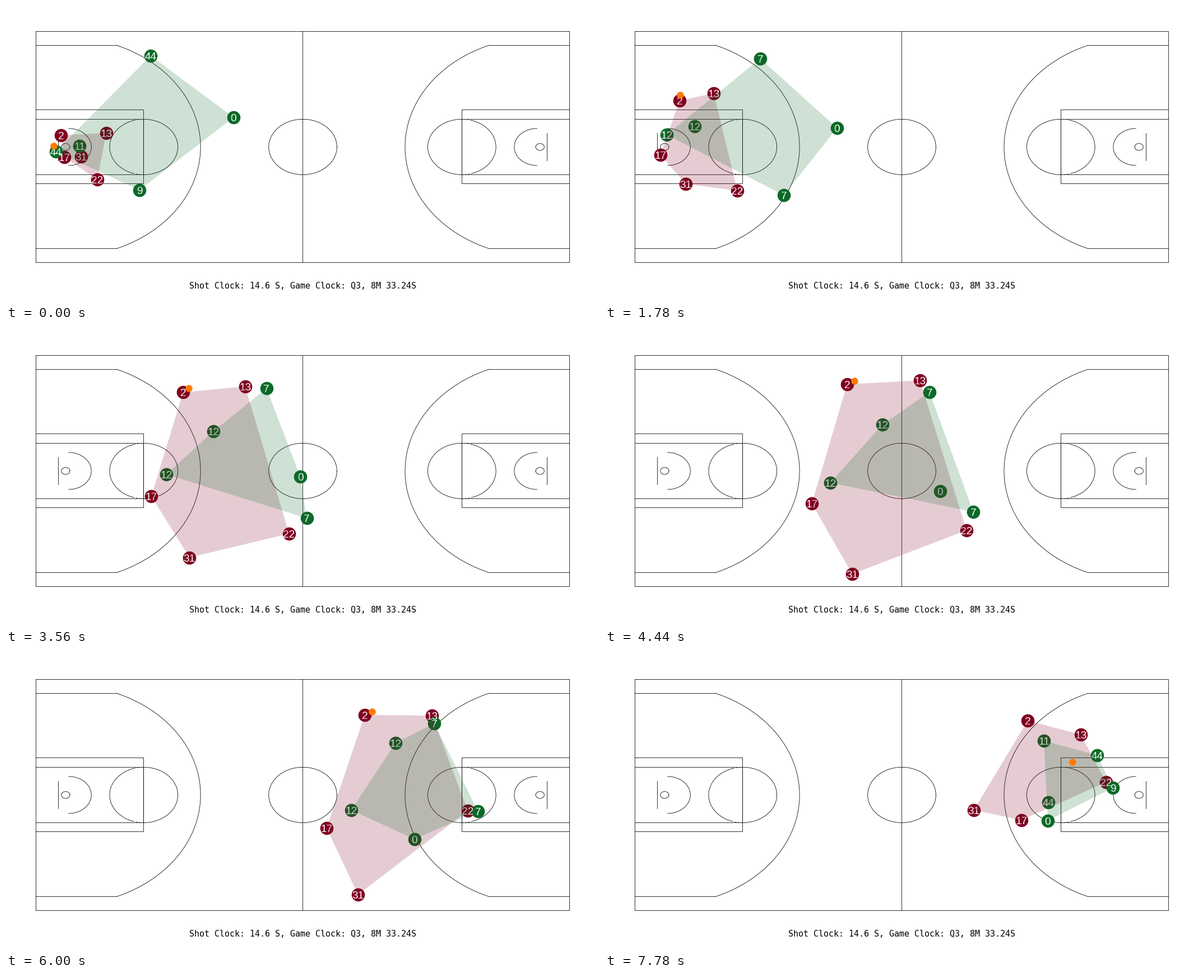
Recreate the animation shown at these times as a matplotlib script. Size 1058x529 px, loop 8 s.

```python
import numpy as np
import matplotlib.pyplot as plt
from matplotlib.animation import FuncAnimation
from matplotlib.patches import Polygon

W, H, DPI = 1058, 529, 100
LOOP_MS, TICK_MS, STEPS = 8000, 20, 36
PT = 72 / DPI  # points per pixel
MAROON, GREEN, ORANGE = "#800020", "#0c6a28", "#ff7a00"

# Each player: rebound, break, midcourt, arrival, set
KEYS = np.array([0, 8, 20, 27, 35])
MAROON_RUNS = {
    "2": [(98, 231), (133, 169), (432, 97), (640, 109), (754, 119)],
    "13": [(179, 227), (194, 156), (562, 90), (760, 110), (849, 144)],
    "17": [(104, 270), (99, 266), (369, 310), (572, 311), (743, 297)],
    "22": [(163, 310), (236, 330), (645, 358), (824, 280), (894, 229)],
    "31": [(134, 269), (144, 318), (441, 436), (628, 430), (658, 279)],
}
# Keyed by the numbers worn at both ends and during the run
GREEN_RUNS = {
    ("44", "7"): [(258, 89), (277, 94), (579, 111), (764, 124), (878, 181)],
    ("0", "0"): [(406, 199), (414, 218), (598, 288), (729, 331), (790, 298)],
    ("11", "12"): [(131, 250), (160, 215), (495, 169), (695, 159), (783, 155)],
    ("44", "12"): [(89, 260), (110, 230), (402, 273), (616, 279), (791, 265)],
    ("9", "7"): [(238, 329), (319, 338), (657, 325), (842, 281), (906, 239)],
}
RUN_START, RUN_END = 4, 31
RIM, PASS_END = np.array([85, 250]), np.array([834, 193])


def smooth(u):
    u = np.clip(u, 0, 1)
    return u * u * (3 - 2 * u)


def glide(points, step):
    """Cubic Hermite curve through the key points at one step."""
    p = np.array(points, float)
    v = np.gradient(p, KEYS, axis=0)
    k = min(np.searchsorted(KEYS, step, side="right"), len(KEYS) - 1) - 1
    h = KEYS[k + 1] - KEYS[k]
    u = (step - KEYS[k]) / h
    bend = u * (1 - u) * h * ((1 - u) * v[k] - u * v[k + 1])
    return p[k] + (p[k + 1] - p[k]) * smooth(u) + bend


def ball_at(step, handler):
    """Picked up near the rim, dribbled ahead of the handler, then passed."""
    dribble = smooth((step - 8) / 12)
    held = handler + np.array([1 + 12 * dribble, -10 + 4 * dribble])
    pos = RIM + (held - RIM) * smooth(step / 8)
    return pos + (PASS_END - pos) * smooth((step - 29) / 6)


def hull(points):
    """Convex hull by monotone chain."""
    pts = sorted(map(tuple, points))

    def chain(seq):
        out = []
        for p in seq:
            while len(out) > 1:
                (x1, y1), (x2, y2) = out[-2:]
                if (x2 - x1) * (p[1] - y1) - (y2 - y1) * (p[0] - x1) > 0:
                    break
                out.pop()
            out.append(p)
        return out[:-1]

    return chain(pts) + chain(pts[::-1])


fig = plt.figure(figsize=(W / DPI, H / DPI), dpi=DPI, facecolor="white")
ax = fig.add_axes([0, 0, 1, 1])
ax.set_xlim(0, W)
ax.set_ylim(H, 0)
ax.axis("off")

# Court, measured in feet
LENGTH, WIDTH = 94, 50
X0, Y0, SX, SY = 53.2, 45.4, 10.135, 8.26


def draw(xs, ys, flip, crisp=False, **kw):
    xs = LENGTH - np.array(xs) if flip else np.array(xs)
    px, py = X0 + xs * SX, Y0 + np.array(ys) * SY
    if crisp:
        px, py = np.floor(px) + 0.5, np.floor(py) + 0.5
    ax.plot(px, py, color="black", lw=0.8 * PT, snap=False, zorder=1, **kw)


def path(xs, ys, flip=False):
    draw(xs, ys, flip, crisp=True, solid_joinstyle="miter")


def arc(cx, r, start, end, flip=False, **kw):
    a = np.radians(np.linspace(start, end, 120))
    draw(cx + r * np.cos(a), WIDTH / 2 + r * np.sin(a), flip, **kw)


def half_court(flip):
    for lane in (17, 19):
        path([0, 19, 19, 0], [lane, lane, WIDTH - lane, WIDTH - lane], flip)
    arc(19, 6, -90, 90, flip)
    arc(19, 6, 107, 253, flip)
    for start in (90, 253):
        arc(19, 6, start, start + 17, flip, dashes=(4, 3))
    arc(5.25, 0.75, 0, 360, flip)
    arc(5.77, 4, -90, 90, flip)
    path([4, 4], [22, 28], flip)
    corner = np.degrees(np.arcsin(22 / 23.75))
    arc(5.25, 23.75, -corner, corner, flip)
    for y in (3, WIDTH - 3):
        path([0, 14.2], [y, y], flip)


path([0, LENGTH, LENGTH, 0, 0], [0, 0, WIDTH, WIDTH, 0])
path([LENGTH / 2] * 2, [0, WIDTH])
arc(LENGTH / 2, 6, 0, 360)
half_court(False)
half_court(True)

ax.text(529.7, 505, "Shot Clock: 14.6 S, Game Clock: Q3, 8M 33.24S",
        family="DejaVu Sans Mono", size=15 * PT, ha="center", va="baseline")


def dots(color, diameter, zorder):
    return ax.scatter([], [], s=(diameter * PT) ** 2, color=color,
                      linewidths=0, zorder=zorder)


class Team:
    def __init__(self, runs, color, order):
        self.runs = list(runs.values())
        self.dots = dots(color, 23.6, 2 + order)
        self.area = ax.add_patch(Polygon([(0, 0)] * 3, facecolor=color,
                                         alpha=0.2, lw=0, zorder=6 + order))
        self.texts = [ax.text(0, 0, "", color="white", size=19 * PT,
                              family="Liberation Sans", ha="center",
                              va="baseline", zorder=5) for _ in runs]

    def show(self, step, labels):
        pts = [glide(run, step) for run in self.runs]
        self.dots.set_offsets(pts)
        self.area.set_xy(hull(pts))
        for text, label, (x, y) in zip(self.texts, labels, pts):
            text.set_text(label)
            text.set_position((x, y + 7))
        return pts


maroon = Team(MAROON_RUNS, MAROON, 0)
green = Team(GREEN_RUNS, GREEN, 1)
ball = dots(ORANGE, 12.5, 9)


def update(tick):
    # The small lead lets each step land on the nearest earlier tick
    step = int((tick * TICK_MS + 14) * STEPS / LOOP_MS) % STEPS
    running = RUN_START <= step < RUN_END
    handler = maroon.show(step, MAROON_RUNS)[0]
    green.show(step, [pair[running] for pair in GREEN_RUNS])
    ball.set_offsets(ball_at(step, handler))
    return []


anim = FuncAnimation(fig, update, frames=LOOP_MS // TICK_MS, interval=TICK_MS,
                     repeat=True, repeat_delay=0, blit=False,
                     cache_frame_data=False)
plt.show()
```
